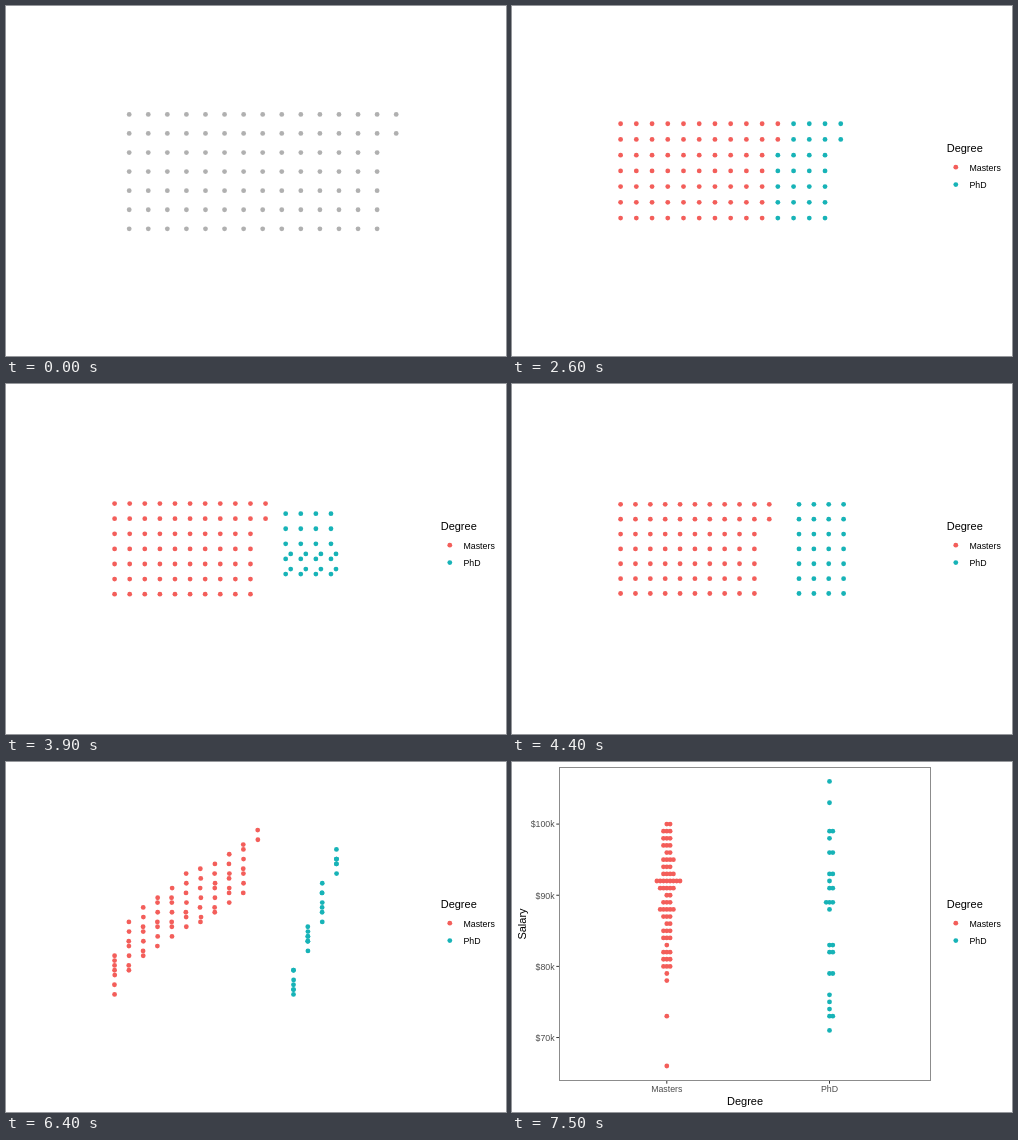
Animation of 500 by 350 pixels, one loop 8 s. Source, as an HTML page:

```html
<!DOCTYPE html>
<html lang="en">
<head>
<meta charset="utf-8">
<title>Salary by degree</title>
<style>
html, body { margin: 0; width: 100%; height: 100%; overflow: hidden; background: #fff; }
svg { display: block; width: 100%; height: 100%; }
text { font: 8.8px "Liberation Sans", Arial, sans-serif; }
.title { font-size: 11px; }
#axes text:not(.title) { fill: #4d4d4d; }
.end { text-anchor: end; }
.mid { text-anchor: middle; }
</style>
</head>
<body>
<svg viewBox="0 0 500 350">
  <g id="axes">
    <rect x="47.5" y="5.5" width="371" height="313" fill="none" stroke="#8c8c8c"/>
    <text class="title mid" x="233" y="343">Degree</text>
    <text class="title mid" transform="translate(13.5 162) rotate(-90)">Salary</text>
  </g>
  <g id="dots"></g>
  <g id="legend">
    <text class="title" x="434.7" y="146">Degree</text>
    <circle cx="443.8" cy="161.2" r="2.4" fill="#f35e5a"/>
    <circle cx="443.8" cy="178.6" r="2.4" fill="#17b3b7"/>
    <text x="457.5" y="164.6">Masters</text>
    <text x="457.5" y="181.9">PhD</text>
  </g>
</svg>
<script>
const LOOP = 8000, STEP = 100, ROWS = 7;
const GREY = '#b0b0b0', COLORS = ['#f35e5a', '#17b3b7'];

// Salaries in $k as "value" or "value x count", ascending
const SALARIES = [
  '66 73 78 79 80x3 81x3 82x3 83 84x3 85x3 86x2 87x3 88x5 89x3 90x2 91x5 92x8 93x4 94x3 95x4 96x2 97x3 98x3 99x3 100x2',
  '71 73x2 74 75 76 79x2 82x2 83x2 88 89x3 91x2 92 93x2 96x2 98 99x2 103 106'
];
const FIRST_COL = [0, 12];

const $ = id => document.getElementById(id);
const clamp = v => Math.min(1, Math.max(0, v));
const mix = (a, b, p) => a + (b - a) * p;

function add(parent, tag, attrs, text) {
  const el = document.createElementNS('http://www.w3.org/2000/svg', tag);
  for (const key in attrs) el.setAttribute(key, attrs[key]);
  if (text) el.textContent = text;
  return parent.appendChild(el);
}

const dots = [];
SALARIES.forEach((list, group) => {
  let k = 0;
  for (const item of list.split(' ')) {
    const [salary, count = 1] = item.split('x').map(Number);
    for (let j = 0; j < count; j++, k++) {
      const n = dots.length;
      dots.push({
        group, salary,
        col: Math.floor(n / ROWS), row: n % ROWS,
        col2: FIRST_COL[group] + Math.floor(k / ROWS), row2: k % ROWS,
        swarm: j % 2 ? (j + 1) / 2 : -j / 2,
        el: add($('dots'), 'circle', { r: 2.4 })
      });
    }
  }
});

const salaryY = s => 304 - 7.115 * (s - 66);
for (const s of [70, 80, 90, 100]) {
  const y = salaryY(s);
  add($('axes'), 'path', { d: `M44.3 ${y}H47`, stroke: '#333' });
  add($('axes'), 'text', { x: 42.6, y: y + 3.4, class: 'end' }, `$${s}k`);
}
[['Masters', 154.8], ['PhD', 317.5]].forEach(([name, x]) => {
  add($('axes'), 'path', { d: `M${x} 319V321.7`, stroke: '#333' });
  add($('axes'), 'text', { x, y: 330, class: 'mid' }, name);
});

const greyGrid = d => [123.2 + 19.07 * d.col, 108.4 + 19.07 * d.row];

// The view widens first, then the groups separate
function splitGroups(t) {
  const size = 223 / (14 + clamp((t - 2200) / 2200));
  const p = clamp((t - 2900) / 1500);
  return d => [
    108.6 + size * mix(d.col, d.col2, p),
    164.9 + size * (mix(d.row, d.row2, p) - 3)
  ];
}

// Grid units blend into salary units while the view rescales
function toSalary(t) {
  const p = clamp((t - 5900) / 1500), q = p - 1 / 15;
  const sx = 1 / (0.06285 - 0.061 * q), sy = 1 / (0.03989 + 0.10903 * q);
  const cx = 219 + 1.9 * q, cy = 166.8 - 7.7 * q;
  return d => [
    cx + sx * mix(d.col2 - 7.5, d.group - 0.5 + 0.0203 * d.swarm, p),
    cy - sy * mix(3 - d.row2, d.salary - 86, p)
  ];
}

const swarmPlot = d => [154.8 + 162.7 * d.group + 3.3 * d.swarm, salaryY(d.salary)];

function draw(t) {
  const place = t < 1500 ? greyGrid : t < 6000 ? splitGroups(t) : t < 7500 ? toSalary(t) : swarmPlot;
  for (const d of dots) {
    const [x, y] = place(d);
    d.el.setAttribute('cx', x.toFixed(2));
    d.el.setAttribute('cy', y.toFixed(2));
    d.el.setAttribute('fill', t < 1500 ? GREY : COLORS[d.group]);
  }
  $('legend').style.display = t < 1500 ? 'none' : '';
  $('axes').style.display = t < 7500 ? 'none' : '';
}

const start = performance.now();
function tick() {
  const t = (performance.now() - start) % LOOP;
  draw(Math.floor(t / STEP) * STEP);
  requestAnimationFrame(tick);
}
tick();
</script>
</body>
</html>
```
